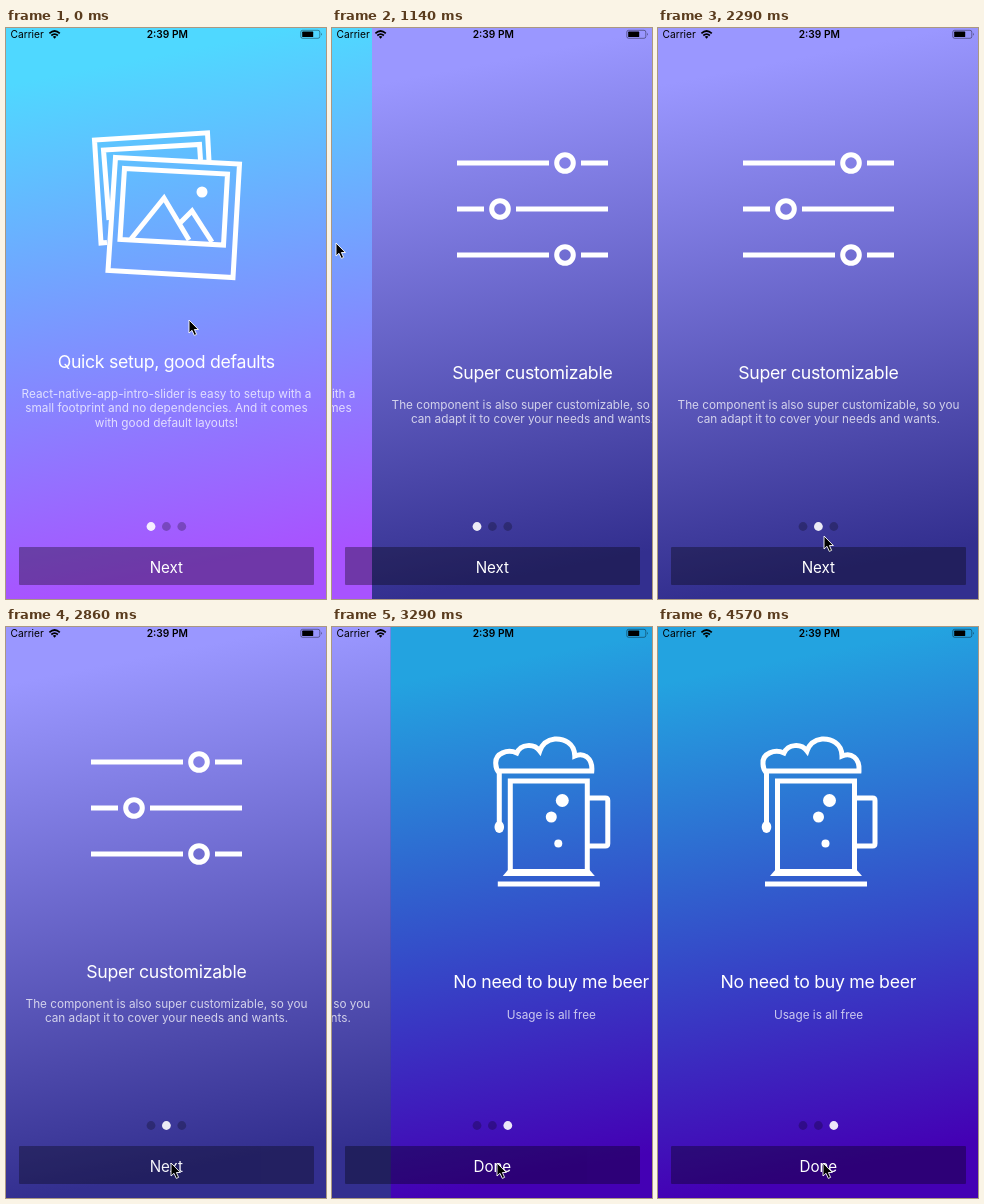
Recreate the animation shown at these times as an HTML page. Size 320 px wide and 571 px high, loop 4.71 s.

```html
<!DOCTYPE html>
<html lang="en">
<head>
<meta charset="utf-8">
<title>Intro slider</title>
<style>
  html, body { margin: 0; height: 100%; overflow: hidden; background: #332f8f; }
  svg { display: block; width: 100%; height: 100%; font-family: Inter, Roboto, sans-serif; }
  text { fill: #fff; text-anchor: middle; }
  .title { font-size: 17.7px; letter-spacing: -.3px; }
  .desc { font-size: 11.78px; fill-opacity: .74; }
  .label { font-size: 15.2px; letter-spacing: -.1px; }
  .status { fill: #000; font-size: 10.2px; }
  .icon { fill: none; stroke: #fff; stroke-width: 5; }
  .solid { fill: #fff; stroke: none; }
</style>
</head>
<body>
<svg viewBox="0 0 320 571">
  <defs id="defs"></defs>
  <g id="pages"></g>

  <text class="status" x="4.5" y="10" style="text-anchor:start">Carrier</text>
  <g fill="none" stroke="#000" stroke-width="1.7">
    <path d="M43.4 5.4Q48.6 .6 53.8 5.4M45.3 7.5Q48.6 4.6 51.9 7.5"/>
    <path d="M46.8 8.8Q48.6 7.2 50.4 8.8L48.6 10.8Z" fill="#000" stroke="none"/>
  </g>
  <text class="status" x="161.3" y="10" font-weight="600">2:39 PM</text>
  <rect x="294.8" y="2.3" width="19" height="8" rx="1.8" fill="none" stroke="#000" stroke-opacity=".5" stroke-width=".8"/>
  <rect x="296.2" y="3.6" width="11" height="5.4" rx=".6"/>
  <path d="M315 4.8Q316.8 6.3 315 7.8Z" opacity=".5"/>

  <g id="dots"></g>
  <g id="button">
    <rect x="13" y="519" width="295" height="38" rx="1" fill-opacity=".34"/>
    <text class="label" id="label" x="160.3" y="544.5">Next</text>
  </g>
  <path id="cursor" d="M0 0V13L3 10.3L5.3 15.4L7.6 14.4L5.4 9.5H9.4Z" stroke="#fff" stroke-width=".9"/>
</svg>
<script>
const LOOP = 4710, STEP = 1000 / 7, PITCH = 322;
const $ = id => document.getElementById(id);

const photos = `
  <path d="M101 214.5L95 215L88.5 112L201.5 104.8L203 133M103 192L97.5 122L193.5 116.5L194.5 132"/>
  <path d="M109.5 129.5L233.5 136L227 249.5L102 242.5Z"/>
  <path d="M118.5 140.5L221.5 146L217.5 217L114 211.5Z"/>
  <path d="M125 211L158 170L183 212M174 195L186 183L206 214"/>
  <circle class="solid" cx="196" cy="164" r="5.5"/>`;

const slider = (x, y) => `
  <path d="M85 ${y}H${x - 16}M${x + 16} ${y}H236"/>
  <circle cx="${x}" cy="${y}" r="8.3"/>`;

const mug = `
  <path d="M107 257H209M119.5 154H196.5V246H119.5Z"/>
  <path class="solid" d="M118 242L112 249H204L198 242Z"/>
  <path d="M198 171H214.5Q217 171 217 173.5V216.5Q217 219 214.5 219H198"/>
  <path d="M106 144H201C202 131 193 125 184 129C184 116 173 111.5 164 112C156 113 151 118 149 124C143 116 130 117 126 126C117 122 104 126 105 137Q105 142 108.5 146V200"/>
  <ellipse class="solid" cx="108.5" cy="200" rx="4.8" ry="6"/>
  <circle class="solid" cx="171.5" cy="173.5" r="6.5"/>
  <circle class="solid" cx="160.5" cy="190" r="5.5"/>
  <circle class="solid" cx="167.5" cy="216.5" r="4"/>`;

const pages = [
  { colors: ['#4fd8ff', '#a853ff'], icon: photos, y: 339.5, title: 'Quick setup, good defaults',
    lines: ['React-native-app-intro-slider is easy to setup with a',
      'small footprint and no dependencies. And it comes', 'with good default layouts!'] },
  { colors: ['#9a97ff', '#332f8f'], icon: slider(193, 135) + slider(128, 181) + slider(193, 227),
    y: 350.5, title: 'Super customizable',
    lines: ['The component is also super customizable, so you', 'can adapt it to cover your needs and wants.'] },
  { colors: ['#23a3e0', '#4400b4'], icon: mug, y: 361, title: 'No need to buy me beer',
    lines: ['Usage is all free'] }
];

$('defs').innerHTML = pages.map(({ colors }, i) => `
  <linearGradient id="bg${i}" x1="0" y1=".1" x2=".1" y2="1">
    <stop stop-color="${colors[0]}"/><stop offset="1" stop-color="${colors[1]}"/>
  </linearGradient>`).join('');

$('pages').innerHTML = pages.map((p, i) => `
  <g transform="translate(${i * PITCH})">
    <rect width="${PITCH}" height="571" fill="url(#bg${i})"/>
    <g class="icon">${p.icon}</g>
    <text class="title" x="160.3" y="${p.y}">${p.title}</text>
    ${p.lines.map((s, n) => `<text class="desc" x="160.5" y="${p.y + 30.5 + n * 14.4}">${s}</text>`).join('')}
  </g>`).join('');

$('dots').innerHTML = [145, 160.4, 175.8].map(x => `<circle cx="${x}" cy="498.5" r="4.4"/>`).join('');

// Rows are [time, value, ...]; returns the interpolated values.
function track(rows, t) {
  const i = rows.findIndex(r => r[0] > t);
  if (i < 0) return rows[rows.length - 1].slice(1);
  if (!i) return rows[0].slice(1);
  const a = rows[i - 1], b = rows[i], f = (t - a[0]) / (b[0] - a[0]);
  return a.slice(1).map((v, n) => v + (b[n + 1] - v) * f);
}
const ease = (t, start, length) => {
  const f = Math.min(1, Math.max(0, (t - start) / length));
  return f * f * (3 - 2 * f);
};

const TAP = 3050;
const swipe = [[650, 0], [710, 8], [860, 64], [1000, 178], [1140, 282], [1290, 313], [1430, 321], [1570, PITCH]];
const press = [[2850, 1], [3000, .2]];
const pointer = [[0, 183, 292], [400, 206, 285], [640, 214, 280], [710, 206, 279], [860, 150, 275],
  [1000, 66, 247], [1140, 4, 215], [1430, 8, 225], [2290, 166, 508], [2570, 165, 536]];

function draw(t) {
  const scroll = track(swipe, t)[0] + PITCH * ease(t, TAP, 330);
  const page = t < 1500 ? 0 : t < TAP ? 1 : 2;
  $('pages').setAttribute('transform', `translate(${-scroll})`);
  [...$('dots').children].forEach((dot, i) => {
    dot.setAttribute('fill', i === page ? '#fff' : '#000');
    dot.setAttribute('fill-opacity', i === page ? .9 : .25);
  });
  $('label').textContent = page === 2 ? 'Done' : 'Next';
  $('button').setAttribute('opacity', track(press, t)[0] + .8 * ease(t, TAP, 250));
  $('cursor').setAttribute('transform', `translate(${track(pointer, t)})`);
}

const start = performance.now();
function tick() {
  const t = (performance.now() - start) % LOOP;
  const step = Math.min(32, Math.floor((t + 4) / STEP));
  draw(Math.round(step * STEP / 10) * 10);
  requestAnimationFrame(tick);
}
tick();
</script>
</body>
</html>
```
